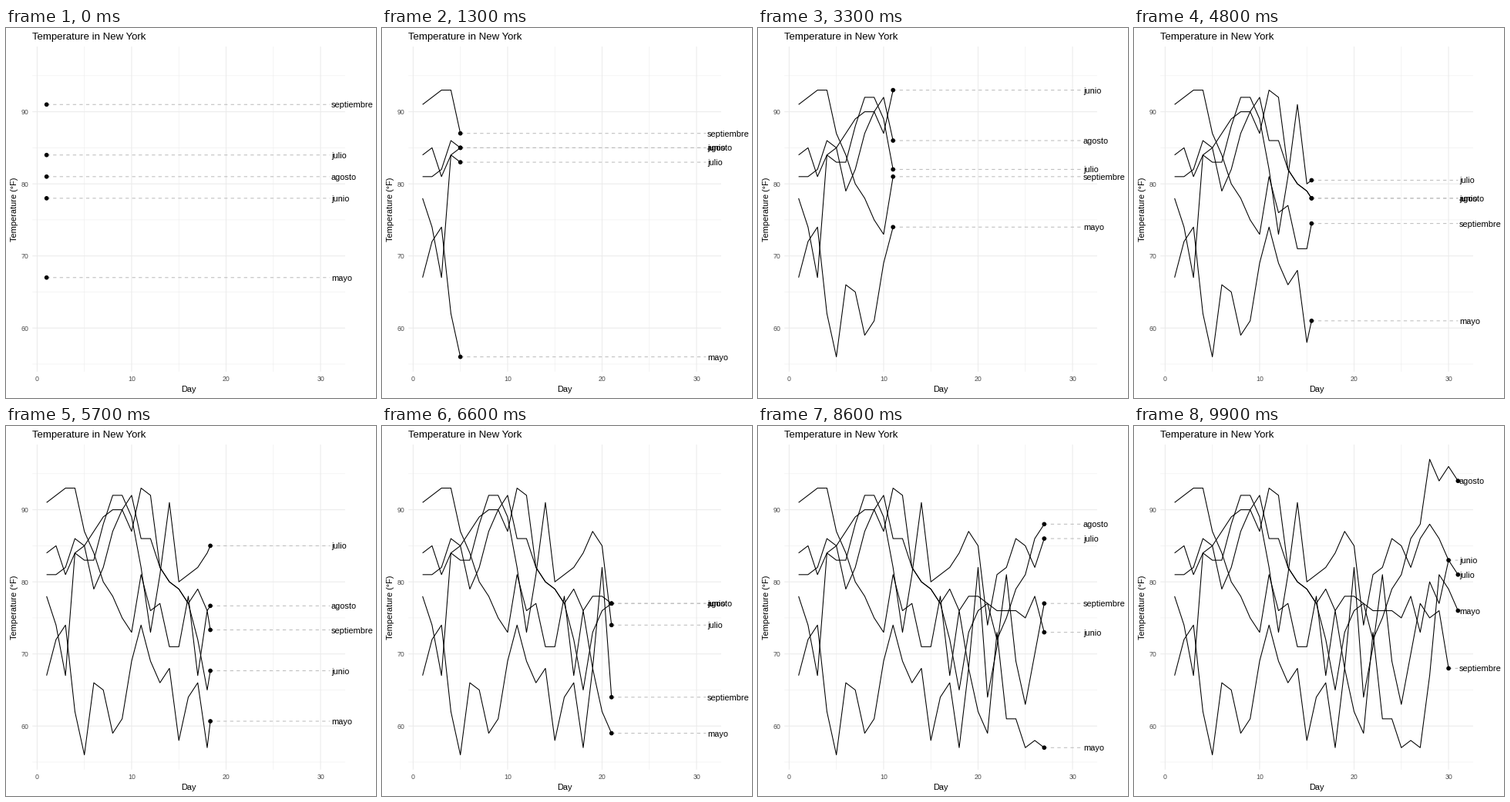
Write a matplotlib script that moves like this. It is 480 by 480 pixels and loops after 10000 ms.

```python
import numpy as np
import matplotlib.pyplot as plt
from matplotlib.animation import FuncAnimation
from matplotlib.patches import Circle

SIZE, FRAMES, INTERVAL = 480, 100, 100
LEFT, RIGHT, TOP, BOTTOM = 34.2, 440, 24, 445.8
X_MIN, X_MAX = -0.505, 32.605
Y_MIN, Y_MAX = 53.95, 99.05
LINE = 1.067  # px, at 72 dpi one point is one pixel

plt.rcParams.update({
    "font.family": "Liberation Sans",
    "path.snap": False,
    "path.simplify": False,
})

# Daily maximum temperatures from the airquality data set
may = [67, 72, 74, 62, 56, 66, 65, 59, 61, 69, 74, 69, 66, 68, 58, 64,
       66, 57, 68, 62, 59, 73, 61, 61, 57, 58, 57, 67, 81, 79, 76]
june = [78, 74, 67, 84, 85, 79, 82, 87, 90, 87, 93, 92, 82, 80, 79,
        77, 72, 65, 73, 76, 77, 76, 76, 76, 75, 78, 73, 80, 77, 83]
july = [84, 85, 81, 84, 83, 83, 88, 92, 92, 89, 82, 73, 81, 91, 80, 81,
        82, 84, 87, 85, 74, 81, 82, 86, 85, 82, 86, 88, 86, 83, 81]
august = [81, 81, 82, 86, 85, 87, 89, 90, 90, 92, 86, 86, 82, 80, 79, 77,
          79, 76, 78, 78, 77, 72, 75, 79, 81, 86, 88, 97, 94, 96, 94]
september = [91, 92, 93, 93, 87, 84, 80, 78, 75, 73, 81, 76, 77, 71, 71,
             78, 67, 76, 68, 82, 64, 71, 81, 69, 63, 70, 77, 75, 76, 68]


def px(day):
    return LEFT + (day - X_MIN) / (X_MAX - X_MIN) * (RIGHT - LEFT)


def py(temp):
    return TOP + (Y_MAX - temp) / (Y_MAX - Y_MIN) * (BOTTOM - TOP)


def whole(v):
    return int(v + 0.5)


fig = plt.figure(figsize=(SIZE / 72, SIZE / 72), dpi=72, facecolor="white")
ax = fig.add_axes([0, 0, 1, 1], xlim=(0, SIZE), ylim=(SIZE, 0))
ax.axis("off")


def text(x, y, s, size=11, ha="left", color="black", **kw):
    return ax.text(x, y, s, fontsize=size, ha=ha, va="baseline",
                   color=color, zorder=5, **kw)


def stroke(xs, ys, color, width=LINE, zorder=1, **kw):
    return ax.plot(xs, ys, color=color, lw=width, zorder=zorder,
                   solid_capstyle="butt", scalex=False, scaley=False, **kw)[0]


def draw_grid():
    for day in range(0, 31, 5):
        width = LINE / (1 + day % 10 / 5)
        stroke([px(day)] * 2, [TOP, BOTTOM], "#EBEBEB", width)
        if day % 10 == 0:
            text(px(day), 458, str(day), 8.8, "center", "#4D4D4D")
    for temp in range(55, 96, 5):
        width = LINE / (1 + temp % 10 / 5)
        stroke([LEFT, RIGHT], [py(temp)] * 2, "#EBEBEB", width)
        if temp % 10 == 0:
            text(29.25, whole(py(temp) + 3.5), str(temp), 8.8, "right", "#4D4D4D")


class Series:
    def __init__(self, name, temps):
        self.temps = np.array(temps)
        self.days = np.arange(1, len(temps) + 1)
        # each day is reached on a whole frame
        self.keys = np.round((self.days - 1) * (FRAMES - 1) / 30)
        self.line = stroke([], [], "black", zorder=2, solid_joinstyle="round")
        self.lead = stroke([], [], "#BEBEBE", zorder=3, linestyle=(0, (4, 4)))
        self.dot = ax.add_patch(Circle((0, 0), 2.84, fc="black", lw=0, zorder=4))
        self.label = text(whole(px(31.1)), 0, name)

    def update(self, i):
        past = self.keys < i
        day = np.interp(i, self.keys, self.days)
        temp = np.interp(i, self.keys, self.temps)
        x, y = px(day), py(temp)
        self.line.set_data(np.append(px(self.days[past]), x),
                           np.append(py(self.temps[past]), y))
        self.lead.set_data([x, px(31)], [y, y])
        self.dot.center = x, y
        self.label.set_y(whole(y + 4))


draw_grid()
text(LEFT, 15, "Temperature in New York", 13.2)
text((LEFT + RIGHT) / 2, 472, "Day", ha="center")
ax.text(14, (TOP + BOTTOM) / 2, "Temperature (°F)", fontsize=11, rotation=90,
        rotation_mode="anchor", ha="center", va="baseline")

series = [Series("mayo", may), Series("junio", june), Series("julio", july),
          Series("agosto", august), Series("septiembre", september)]


def update(i):
    for s in series:
        s.update(i)
    return []


anim = FuncAnimation(fig, update, frames=FRAMES, interval=INTERVAL,
                     repeat=True, repeat_delay=0)
plt.show()
```
